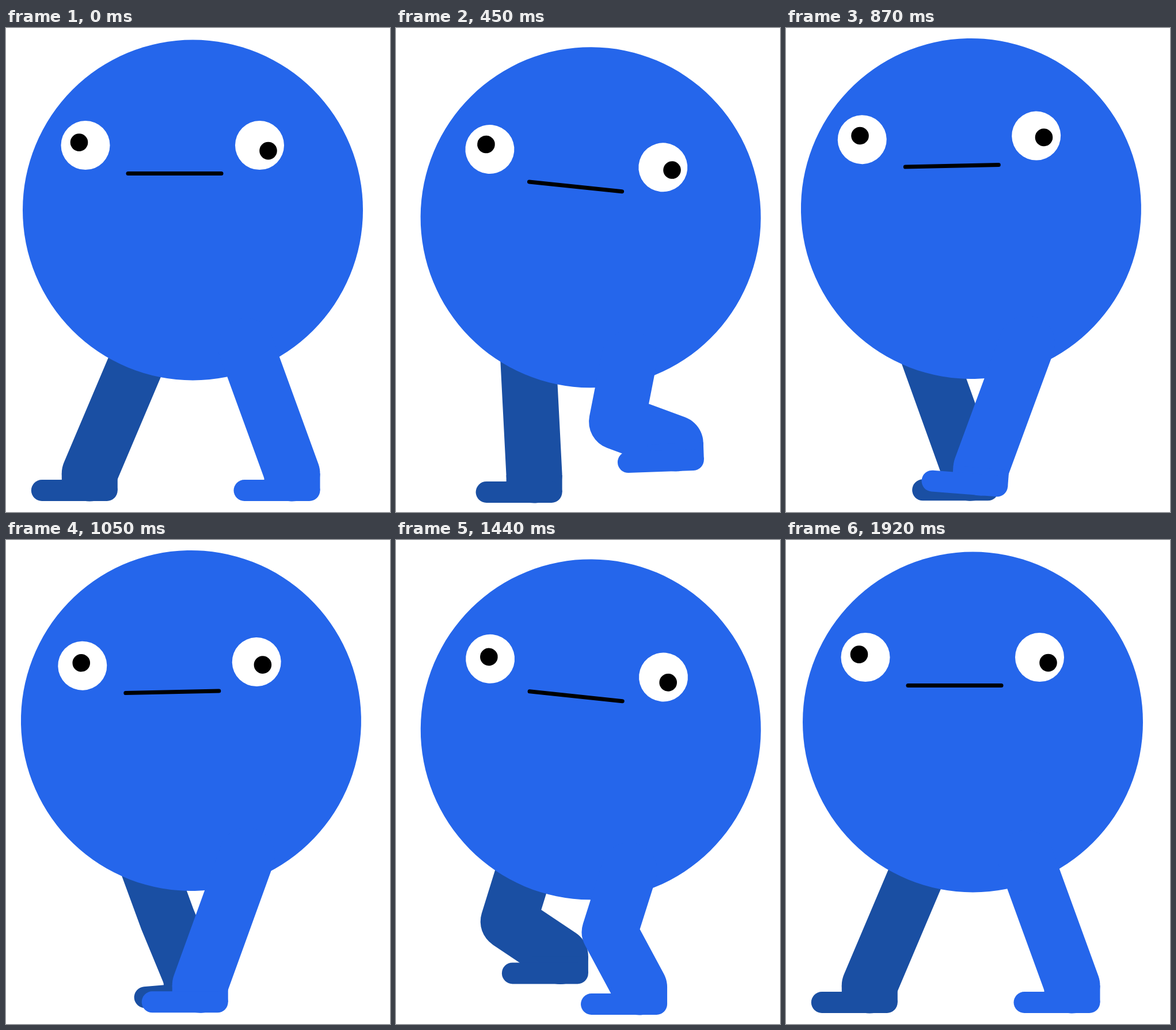
Animation, 667 px wide and 840 px high, one loop 1950 ms. Source, as an HTML page with a canvas:

```html
<!DOCTYPE html>
<html lang="en">
<head>
<meta charset="utf-8">
<title>Walking ball</title>
<style>
html, body { margin: 0; width: 100%; height: 100%; overflow: hidden; background: #fff; }
canvas { display: block; }
</style>
</head>
<body>
<canvas id="stage" width="667" height="840"></canvas>
<script>
const ctx = document.getElementById('stage').getContext('2d');
const LOOP = 1950, STEP = 30, WALK = 1920, HALF = WALK / 2;
const BLUE = '#2566eb', NAVY = '#1a4fa3';
const PIVOT = { x: 208.5, y: 454 };
const THIGH = 112.5, SHIN = 108.5, STRIDE = 176.5, GROUND = 773;

// front: ankle x at landing; swing: [share of the swing, x, y] on the way forward
const farLeg = {
  color: NAVY, hip: { x: 239, y: 552 }, front: 145.3, delay: 0, toeDown: 8.7, toeUp: 18,
  swing: [[0.28, 318, 712.5], [0.72, 229, 741.5]]
};
const nearLeg = {
  color: BLUE, hip: { x: 416.5, y: 552 }, front: 320.5, delay: HALF, toeDown: 10.9, toeUp: 8,
  swing: [[0.28, 505, 726.5], [0.656, 445, 719]]
};

const mix = (a, b, u) => a + (b - a) * u;
const smooth = u => u * u * (3 - 2 * u);
const rad = deg => deg * Math.PI / 180;

// Degrees: leans to 6 twice per walk, back to -2 midway and 0 at the ends
function tiltAt(t) {
  const rise = 1 - Math.abs(t % HALF / (HALF / 2) - 1);
  const low = Math.abs(t - HALF) < HALF / 2 ? -2 : 0;
  return mix(low, 6, smooth(rise));
}

// Pupils drift between three poses
function pupilAt(poses, t) {
  const u = t / WALK * 3, i = Math.floor(u);
  const a = poses[i], b = poses[(i + 1) % 3];
  return [mix(a[0], b[0], u - i), mix(a[1], b[1], u - i)];
}

// Smooth curve through keys [u, ...values], at rest at both ends
function curve(keys, k, u) {
  let i = 0;
  while (i < keys.length - 2 && u >= keys[i + 1][0]) i++;
  const slope = j => (keys[j + 1][k] - keys[j][k]) / (keys[j + 1][0] - keys[j][0]);
  const tangent = j => {
    if (j === 0 || j === keys.length - 1) return 0;
    const a = slope(j - 1), b = slope(j);
    return a * b > 0 ? 2 * a * b / (a + b) : 0;
  };
  const h = keys[i + 1][0] - keys[i][0], s = (u - keys[i][0]) / h, r = 1 - s;
  return mix(keys[i][k], keys[i + 1][k], smooth(s))
    + h * s * r * (tangent(i) * r - tangent(i + 1) * s);
}

function ankleAt(leg, tilt, t) {
  const phase = (t + leg.delay) % WALK, u = phase % HALF / HALF;
  if (phase < HALF) {
    const slide = u + 1.25 * u ** 3 * (1 - u);
    return { x: leg.front + STRIDE * slide, y: GROUND + tilt / 2, turn: 0 };
  }
  const keys = [[0, leg.front + STRIDE, GROUND], ...leg.swing, [1, leg.front, GROUND]];
  const wave = Math.sin(2 * Math.PI * u);
  return {
    x: curve(keys, 1, u),
    y: curve(keys, 2, u),
    turn: -wave * (wave > 0 ? leg.toeDown : leg.toeUp)
  };
}

function disc(x, y, r, color) {
  ctx.fillStyle = color;
  ctx.beginPath();
  ctx.arc(x, y, r, 0, 2 * Math.PI);
  ctx.fill();
}

function line(points, width, color) {
  ctx.strokeStyle = color;
  ctx.lineWidth = width;
  ctx.beginPath();
  points.forEach(p => ctx.lineTo(...p));
  ctx.stroke();
}

function drawLeg(leg, tilt, t) {
  const { color, hip } = leg, ankle = ankleAt(leg, tilt, t);
  const c = Math.cos(rad(tilt)), s = Math.sin(rad(tilt));
  const vx = hip.x - PIVOT.x, vy = hip.y - PIVOT.y;
  const hx = PIVOT.x + vx * c - vy * s, hy = PIVOT.y + vx * s + vy * c;

  // Two-bone leg that stretches when the ankle is out of reach
  const dx = ankle.x - hx, dy = ankle.y - hy, d = Math.hypot(dx, dy);
  const stretch = Math.max(1, d / (THIGH + SHIN));
  const a = THIGH * stretch, b = SHIN * stretch;
  const bend = Math.acos(Math.min(1, (a * a + d * d - b * b) / (2 * a * d)));
  const angle = Math.atan2(dy, dx) + bend;
  const knee = [hx + a * Math.cos(angle), hy + a * Math.sin(angle)];
  line([[hx, hy], knee, [ankle.x, ankle.y]], 97, color);

  ctx.save();
  ctx.translate(ankle.x, ankle.y);
  ctx.rotate(rad(ankle.turn));
  ctx.fillStyle = color;
  ctx.fillRect(-48.5, 0, 97, 29.5);
  line([[-83, 29.5], [30, 29.5]], 37, color);
  ctx.restore();
}

function drawEye(x, y, [px, py]) {
  disc(x, y, 42.5, '#fff');
  disc(x + px, y + py, 15.3, '#000');
}

function drawBody(tilt, t) {
  ctx.save();
  ctx.translate(PIVOT.x, PIVOT.y);
  ctx.rotate(rad(tilt));
  ctx.translate(-PIVOT.x, -PIVOT.y);
  disc(324.5, 316, 295.5, BLUE);
  ctx.translate(0, 4.5 - 22.5 * Math.cos(2 * Math.PI * (t - 750) / HALF));
  drawEye(138, 203.5, pupilAt([[-11, -5], [-5.7, -9.1], [0.2, -2.6]], t));
  drawEye(440.5, 203.5, pupilAt([[15, 9.5], [16.6, 0.3], [7.2, 8.1]], t));
  line([[212, 252.5], [374, 252.5]], 7, '#000');
  ctx.restore();
}

function draw(now) {
  const t = Math.floor(now % LOOP / STEP) * STEP % WALK;
  const tilt = tiltAt(t);
  ctx.fillStyle = '#fff';
  ctx.fillRect(0, 0, 667, 840);
  ctx.lineCap = ctx.lineJoin = 'round';
  drawLeg(farLeg, tilt, t);
  drawBody(tilt, t);
  drawLeg(nearLeg, tilt, t);
}

const start = performance.now();
function frame() {
  draw(performance.now() - start);
  requestAnimationFrame(frame);
}
frame();
</script>
</body>
</html>
```
